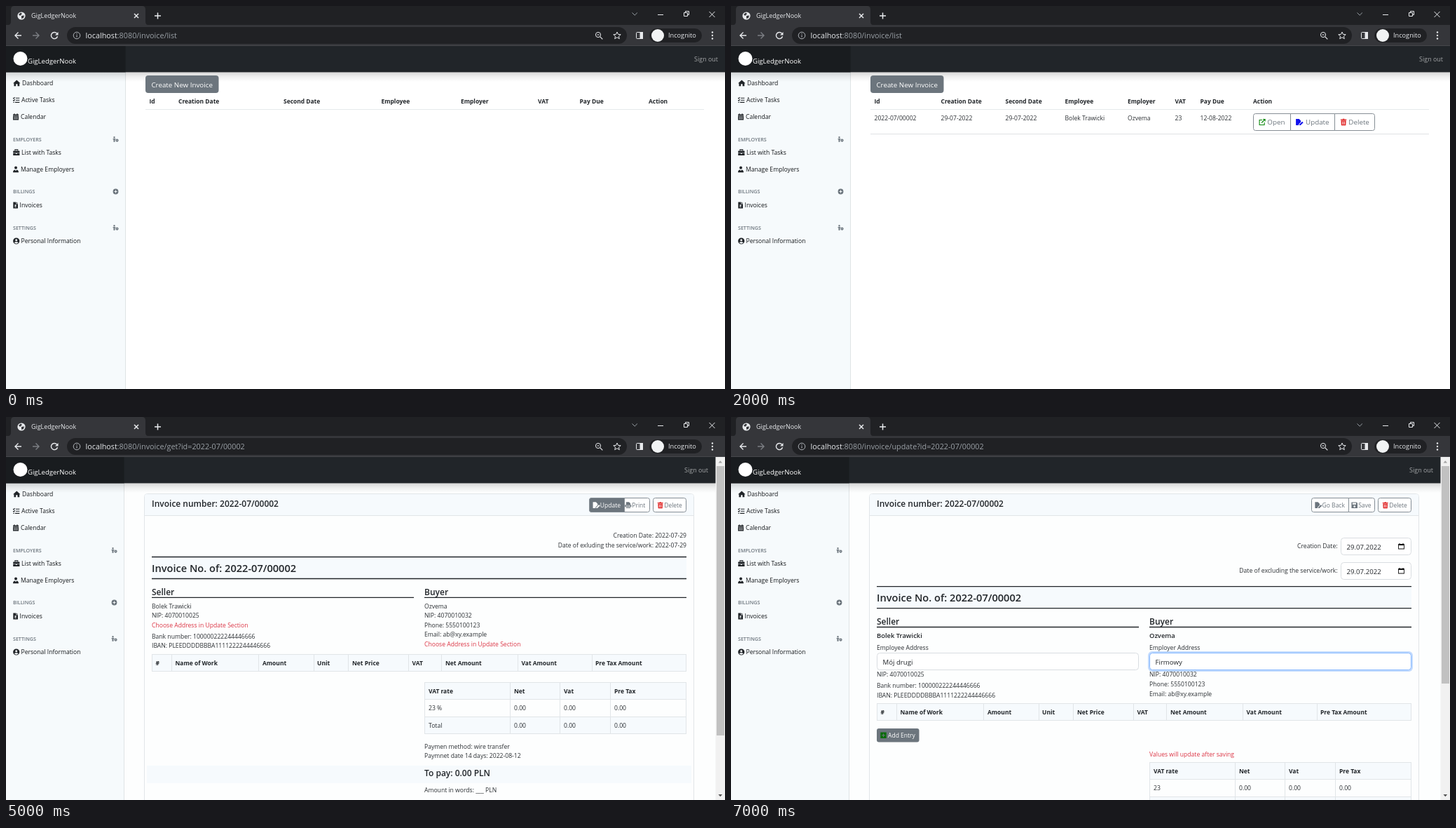
An HTML page that plays this animation: 1026 by 546 pixels, repeating every 8000 ms.

```html
<!DOCTYPE html>
<html lang="en">
<head>
<meta charset="utf-8">
<title>Invoices</title>
<style>
html, body { margin: 0; width: 100%; height: 100%; overflow: hidden; background: #fff; }
svg { display: block; width: 100%; height: 100%; }
text { font-family: "Open Sans", "Noto Sans", sans-serif; white-space: pre; }
</style>
</head>
<body>
<svg id="stage" viewBox="0 0 1026 546"></svg>
<script>
const INK = '#212529', GREY = '#6c757d', PALE = '#f6fafd', EDGE = '#e1e5e8', RED = '#dc3545', BODY = 8.6;
const BRAND = 'GigLedgerNook', SELLER = 'Bolek Trawicki', BUYER = 'Ozvema', NUMBER = '2022-07/00002';
const SECONDS = 8;

const text = (x, y, str, size = BODY, fill = '#2b2f33', weight = 400, anchor = 'start') =>
  `<text x="${x}" y="${y}" font-size="${size}" fill="${fill}" font-weight="${weight}" text-anchor="${anchor}">${str}</text>`;
const bold = (x, y, str) => text(x, y, str, 8.45, INK, 700);
const heading = (x, y, str, size = 12) => text(x, y, str, size, INK, 600);
const rect = (x, y, x2, y2, fill, r = 0, stroke = 'none') =>
  `<rect x="${x}" y="${y}" width="${x2 - x}" height="${y2 - y}" rx="${r}" fill="${fill}" stroke="${stroke}"/>`;
const circle = (x, y, r, fill, stroke = 'none') =>
  `<circle cx="${x}" cy="${y}" r="${r}" fill="${fill}" stroke="${stroke}"/>`;
const line = (d, color, width = 1) =>
  `<path d="${d}" fill="none" stroke="${color}" stroke-width="${width}"/>`;

// Icons are drawn around 0,0: [filled path, stroked path]
const ICONS = {
  home: ['M-5.2 .3L0-4.6 5.2 .3H3.9V4.2H1.2V1.2H-1.2V4.2H-3.9V.3Z', ''],
  tasks: ['', 'M-4.6-3l1 1 1.6-2M-4.6 .1l1 1 1.6-2M-4.3 3.4h1.3M-.8-2.8H4.6M-.8 .2H4.6M-1.8 3.4H4.6'],
  calendar: ['M-4-3.4h8v1.6h-8ZM-4-1.2h8v5.6h-8ZM-2.8 0v1h1.4v-1ZM-.7 0v1h1.4v-1ZM1.4 0v1h1.4v-1ZM-2.8 2v1h1.4v-1ZM-.7 2v1h1.4v-1ZM1.4 2v1h1.4v-1Z', 'M-2-4.8v2M2-4.8v2'],
  briefcase: ['M-4.6-2.6h9.2V.4h-9.2ZM-4.6 1H-1V2H1V1H4.6V4h-9.2Z', 'M-2-2.6v-1.5h4v1.5'],
  user: ['M-2-2.4a2 2.1 0 1 0 4 0a2 2.1 0 1 0-4 0M-4 4.3C-4 1.7-2.6 .6-1.4 .6L0 2 1.4 .6C2.6 .6 4 1.7 4 4.3Z', ''],
  invoice: ['M-3.3-4.5H.8V-1.8H3.4V4.5H-3.3ZM1.4-4.5L3.4-2.4H1.4ZM-1-.8V2.8H1V2H-.2V1.2H1V-.8Z', ''],
  profile: ['M-4.6 0a4.6 4.6 0 1 0 9.2 0a4.6 4.6 0 1 0-9.2 0M-1.5-1.2a1.5 1.5 0 1 1 3 0a1.5 1.5 0 1 1-3 0M-2.8 2.6C-2.2 .9 2.2 .9 2.8 2.6C1.4 4-1.4 4-2.8 2.6', ''],
  plus: ['M-3.9 0a3.9 3.9 0 1 0 7.8 0a3.9 3.9 0 1 0-7.8 0M-2-.5H-.5V-2H.5V-.5H2V.5H.5V2H-.5V.5H-2Z', ''],
  person: ['M-3.2-2.8a1.2 1.2 0 1 0 2.4 0a1.2 1.2 0 1 0-2.4 0M-.1 1.6a2.1 2.1 0 1 0 4.2 0a2.1 2.1 0 1 0-4.2 0M1.3 1.2h1.4v.9h-1.4ZM-3-1H-1V3.8H-3Z', 'M-4-.3H0'],
  open: ['', 'M0-3H-4V4H3V.5M1-4H4V-1M4-4L-1 1'],
  edit: ['M-5-4.6H-.5L2-2.1V0L-1 3V4.6H-5ZM0 3.2L4 -.8 5.6 .8 1.6 4.6H0Z', ''],
  trash: ['M-4.2-4H-1.5L-1-4.8H1L1.5-4H4.2V-2.8H-4.2ZM-3.6-2.2H3.6L3.2 4.7H-3.2ZM-2-1V3.4H-1.3V-1ZM-.4-1V3.4H.4V-1ZM1.3-1V3.4H2V-1Z', ''],
  print: ['M-3-4.6H1.4L3.4-2.6V-.8H-3ZM-4.8-.6H4.8V2.8H-4.8ZM-3.2 .6V1.8H-2V.6ZM-.8 .6V1.8H.4V.6ZM1.6 .6V1.8H3V.6Z', 'M-3 3.8H3.4'],
  save: ['M-4.5-4.5H3L4.5-3V4.5H-4.5ZM-3-3.4V-1H2.4V-3.4ZM-1.5 2a1.5 1.5 0 1 1 3 0a1.5 1.5 0 1 1-3 0', ''],
  add: ['M-4.2-4.2H4.2V4.2H-4.2ZM-2.4-.5H-.5V-2.4H.5V-.5H2.4V.5H.5V2.4H-.5V.5H-2.4Z', ''],
  date: ['M-4.4-3.6H4.4V4H-4.4ZM-3.5-1.4V3.1H3.5V-1.4Z', 'M-2.5-4.6v1.5M2.5-4.6v1.5']
};
const icon = (name, x, y, color = INK, scale = 1) => {
  const [solid, stroke] = ICONS[name];
  return `<g transform="translate(${x} ${y}) scale(${scale})"><path d="${solid}" fill="${color}" fill-rule="evenodd"/>${line(stroke, color, 1.1)}</g>`;
};

const browser = () => {
  const w = '#e8eaed';
  return rect(0, 0, 1026, 28, '#202124') + rect(0, 27, 1026, 57, '#35363a') +
    line('M0 56.5H1026', '#47484c') +
    `<path d="M3 27Q7 27 7 22V5Q7 0 12 0H194Q199 0 199 5V22Q199 27 203 27Z" fill="#35363a"/>` +
    circle(22, 14, 5.6, w) + `<path d="M18 12L21 9.5 23 11 20 14ZM22 14L26 13.5 25 17 22 18Z" fill="#35363a"/>` +
    text(36, 17, BRAND, 8.9, w) +
    line('M183 11l6 6m0-6l-6 6M212 14h9m-4.5-4.5v9', w, 1.5) +
    line('M893.5 9.5l3.7 3.7 3.7-3.7', '#9aa0a6') +
    line('M930 12.5h8M967.5 9.5h5v5h-5ZM969.5 9.5v-2h5v5h-2M1003.5 8l8 8m0-8l-8 8', w) +
    line('M22 42H13m4.5-4.5L13 42l4.5 4.5', w, 1.4) +
    line('M38 42H47m-4.5-4.5L47 42l-4.5 4.5', '#7c7f84', 1.4) +
    line('M72.5 39A4.6 4.6 0 1 0 73.5 43.2', w, 1.4) + `<path d="M74.5 37v4.5h-4.5Z" fill="${w}"/>` +
    rect(87, 30, 886, 54, '#202124', 12) +
    circle(101, 42, 4.8, 'none', '#b0b4b9') + line('M101 41.5v3M101 39v1.2', '#b0b4b9', 1.1) +
    circle(845, 41, 3.6, 'none', w) + line('M843.5 41h3M847.8 43.8l3.5 3.5', w, 1.2) +
    line('M872 37l1.5 3.4 3.7.3-2.8 2.4.9 3.6-3.3-2-3.3 2 .9-3.6-2.8-2.4 3.7-.3Z', w) +
    rect(899.5, 37.5, 908.5, 46.5, 'none', 1, w) + rect(904.5, 37, 909, 47, w) +
    rect(918, 32, 993, 52, '#202124', 10) + circle(930, 42, 9, '#f1f3f4') +
    text(945, 45.3, 'Incognito', 9.2, w) +
    [37.5, 42, 46.5].map(y => circle(1008, y, 1.2, w)).join('');
};

const MENU = [
  ['home', 15.3, 23, 110, 'Dashboard'], ['tasks', 14.7, 22, 134, 'Active Tasks'], ['calendar', 14, 21, 158, 'Calendar'],
  ['briefcase', 14.8, 22, 209, 'List with Tasks'], ['user', 14, 21, 233, 'Manage Employers'],
  ['invoice', 13.6, 19.5, 284, 'Invoices'], ['profile', 14.7, 21.5, 335, 'Personal Information']
];
const SECTIONS = [['EMPLOYERS', 190, 'person'], ['BILLINGS', 264.5, 'plus'], ['SETTINGS', 316, 'person']];

const scrollbar = end => rect(1012.5, 57, 1026, 546, '#f1f1f1') + rect(1014, 70, 1025, end, '#c1c1c1') +
  `<path d="M1016.5 65.5l2.8-3.2 2.8 3.2Z" fill="#a3a3a3"/><path d="M1016.5 538l2.8 3.2 2.8-3.2Z" fill="#505050"/>`;

// Address, header and sidebar; a scrollbar narrows the page.
const page = (path, scrollEnd) => {
  const side = scrollEnd ? 168.5 : 170.5, right = scrollEnd ? 1002 : 1016;
  return `<text x="113.5" y="45.8" font-size="10.8" fill="#9aa0a6"><tspan fill="#e8eaed">localhost</tspan>:8080/invoice/${path}</text>` +
    rect(0, 57, 1026, 546, scrollEnd ? '#fdfefe' : '#fff') +
    rect(0, 94, side, 546, '#f6fafc') + line(`M${side} 94V546`, '#dfe3e5') +
    rect(0, 94, 1026, 108, 'url(#shade)') +
    rect(0, 57, 1026, 94.4, INK) + rect(0, 57, side, 94.4, '#191c1f') +
    circle(20.5, 75, 10, '#fff') + text(31, 82, BRAND, 9.55, '#fff') +
    text(right, 79.2, 'Sign out', 8.95, '#a2a4a6', 400, 'end') +
    MENU.map(([name, ix, x, y, label]) => icon(name, ix, y) + text(x, y + 3.2, label, 8.6, '#15181b')).join('') +
    SECTIONS.map(([label, y, name]) => text(10, y + 2.6, label, 7.1, GREY, 600) + icon(name, side - 14, y, GREY)).join('') +
    (scrollEnd ? scrollbar(scrollEnd) : '');
};

const field = (x, y, x2, value, focus) =>
  (focus ? rect(x - 2.5, y - 2.5, x2 + 2.5, y + 26.5, '#c2dbfe', 6) : '') +
  rect(x, y, x2, y + 24, '#fff', 4, focus ? '#86b7fe' : '#d9dde1') +
  text(x + 8, y + 16.2, value, 9.65, INK);
const dateField = (x, y, x2) => field(x, y, x2, '29.07.2022') + icon('date', x2 - 14, y + 12, '#111');

// A button segment, rounded only on the sides named in ends
const segment = (x, y, x2, y2, ends, fill = '#fff') => {
  const l = ends.includes('l') ? 3 : 0, r = ends.includes('r') ? 3 : 0;
  return `<path d="M${x + l} ${y}H${x2 - r}q${r} 0 ${r} ${r}V${y2 - r}q0 ${r} ${-r} ${r}H${x + l}q${-l} 0 ${-l} ${-l}V${y + l}q0 ${-l} ${l} ${-l}Z" fill="${fill}" stroke="#868e95"/>`;
};
const rowButton = (x, x2, ends, name, color, label, tx, active) =>
  segment(x, 153.5, x2, 177.5, ends, active ? GREY : '#fff') + icon(name, x + 12.6, 165.5, color) +
  text(tx, 169, label, 9.8, active ? '#fff' : GREY);
const cardButton = (x, x2, ends, name, color, label, tx, active) =>
  segment(x, 115.5, x2, 135.5, ends, active ? GREY : '#fff') + icon(name, tx - 5.5, 125.7, color, .95) +
  text(tx, 129, label, 8.5, active ? '#fff' : GREY);

const COLUMNS = ['Id', 'Creation Date', 'Second Date', 'Employee', 'Employer', 'VAT', 'Pay Due', 'Action'];
const listPage = xs => page('list') + rect(199, 99, 303.5, 124, GREY, 4) +
  text(251.2, 115.5, 'Create New Invoice', 9.8, '#fff', 400, 'middle') +
  xs.map((x, i) => bold(x, 138.5, COLUMNS[i])).join('') + line('M199 147.5H996', '#e6e9eb');
const openButton = active => rowButton(745.5, 798.5, 'l', 'open', '#0a870a', 'Open', 765.3, active);

const emptyList = () => listPage([204.5, 246, 396, 535.5, 649, 759, 818.5, 917]);
const filledList = () => {
  const xs = [204.5, 299.5, 391.5, 476.5, 566, 633.5, 669.5, 745];
  const row = [NUMBER, '29-07-2022', '29-07-2022', SELLER, BUYER, '23', '12-08-2022'];
  return listPage(xs) + row.map((value, i) => text(xs[i], 163.3, value)).join('') +
    line('M199 182.5H996', '#dfe2e5') + openButton(false) +
    rowButton(798.5, 861.5, '', 'edit', '#1010ee', 'Update', 820, false) +
    rowButton(861.5, 918.5, 'r', 'trash', '#e02020', 'Delete', 881.3, false);
};

const createPage = () => page('create') + heading(199, 119.5, 'Invoice:', 19) +
  text(199, 139, 'Invoice Creation Date:', 8.5) + dateField(199.5, 142.5, 994.5) +
  text(199, 177, 'Employee:', 8.5) + field(199.5, 180.5, 994.5, SELLER) +
  text(199, 214.5, 'Employer:', 8.5) + field(199.5, 218.5, 994.5, BUYER, true) +
  rect(199, 248, 995, 272.2, '#0d6efd', 4) + rect(199, 272.2, 995, 296.5, GREY, 4) +
  text(597, 264, 'Create', 9.7, '#fff', 400, 'middle') + text(597, 288.5, 'Cancel', 9.7, '#fff', 400, 'middle');

const card = () => rect(197.5, 109.5, 981.5, 560, '#fdfefe', 4, EDGE) + rect(198, 110, 981, 140.5, PALE, 3) +
  line('M198 140.5H981', EDGE) + heading(208, 128, 'Invoice number: ' + NUMBER) +
  cardButton(923.5, 970.5, 'lr', 'trash', '#e02020', 'Delete', 939.2);
const titles = y => rect(208, y, 971, y + 31, PALE) + line(`M208 ${y}H971M208 ${y + 31}H971`, INK, 1.3) +
  heading(208, y + 21.6, 'Invoice No. of: ' + NUMBER, 14.6) +
  heading(208, y + 54.2, 'Seller') + heading(597, y + 54.2, 'Buyer') +
  line(`M208 ${y + 57.8}H582M597 ${y + 57.8}H971`, INK, 1.3);
const lines = (x, rows) => rows.map(([y, str, color]) => text(x, y, str, BODY, color)).join('');

const dividers = (xs, y, height) => line(xs.map(x => `M${x} ${y}v${height}`).join(''), EDGE);
const workTable = y => rect(208.5, y, 970.5, y + 24, PALE, 0, EDGE) +
  dividers([236.5, 360.5, 439.5, 488.5, 574.5, 621.5, 730.5, 836.5], y, 24) +
  [[213.5, '#'], [241.5, 'Name of Work'], [366, 'Amount'], [444, 'Unit'], [494, 'Net Price'], [579.5, 'VAT'],
    [627, 'Net Amount'], [735.5, 'Vat Amount'], [841, 'Pre Tax Amount']].map(([x, s]) => bold(x, y + 15.5, s)).join('');
const totals = (y, labels) => {
  const xs = [603, 725, 796, 868], rowTop = i => y + Math.round(i * 24.4);
  return ['VAT rate', ...labels].map((label, i) => {
    const cells = i ? [label, '0.00', '0.00', '0.00'] : [label, 'Net', 'Vat', 'Pre Tax'];
    return rect(597.5, rowTop(i), 970.5, rowTop(i + 1), i === 1 ? '#fdfefe' : PALE, 0, EDGE) +
      cells.map((s, c) => (i ? text : bold)(xs[c], rowTop(i) + 15.7, s)).join('');
  }).join('') + dividers([719.5, 790.5, 862.5], y, rowTop(labels.length + 1) - y);
};

const NIP = 'NIP: 4070010025', BUYER_NIP = 'NIP: 4070010032', PHONE = 'Phone: 5550100123', EMAIL = 'Email: ab@xy.example';
const BANK = 'Bank number: 100000222244446666', IBAN = 'IBAN: PLEEDDDDBBBA1111222244446666';
const CHOOSE = 'Choose Address in Update Section';

const updateButton = active => cardButton(832.5, 882.5, 'l', 'edit', active ? '#fff' : GREY, 'Update', 847.8, active);
const invoicePage = () => page('get?id=' + NUMBER, 454) + card() +
  updateButton(false) + cardButton(882.5, 918.5, 'r', 'print', GREY, 'Print', 893.3) +
  text(971, 172.2, 'Creation Date: 2022-07-29', BODY, undefined, 400, 'end') +
  text(971, 185.6, 'Date of exluding the service/work: 2022-07-29', BODY, undefined, 400, 'end') +
  titles(199.5) +
  lines(208, [[273, SELLER], [286.4, NIP], [299.8, CHOOSE, RED], [315.8, BANK], [329.2, IBAN]]) +
  lines(597, [[273, BUYER], [286.4, BUYER_NIP], [299.8, PHONE], [313.4, EMAIL], [327, CHOOSE, RED]]) +
  workTable(338.5) + totals(378.5, ['23 %', 'Total']) +
  lines(597, [[472.5, 'Paymen method: wire transfer'], [486, 'Paymnet date 14 days: 2022-08-12'], [535.2, 'Amount in words: ___ PLN']]) +
  rect(201, 497, 978, 522, PALE) + heading(597, 512.3, 'To pay: 0.00 PLN');

const updatePage = () => page('update?id=' + NUMBER, 380) + card() +
  cardButton(828.5, 881.5, 'l', 'edit', GREY, 'Go Back', 843.6) + cardButton(881.5, 918.5, 'r', 'save', GREY, 'Save', 895.2) +
  text(865.5, 187, 'Creation Date:', BODY, undefined, 400, 'end') + dateField(870.5, 172.5, 970.5) +
  text(865.5, 221.5, 'Date of excluding the service/work:', BODY, undefined, 400, 'end') + dateField(870.5, 207.5, 970.5) +
  titles(241.7) + text(208, 315.2, SELLER, 9.4, INK, 600) + text(597, 315.2, BUYER, 9.4, INK, 600) +
  lines(208, [[332.4, 'Employee Address'], [370.3, NIP], [386.4, BANK], [399.8, IBAN]]) +
  lines(597, [[332.4, 'Employer Address'], [370.3, BUYER_NIP], [383.8, PHONE], [397.5, EMAIL], [483.7, 'Values will update after saving', RED]]) +
  field(208.5, 336.5, 581.5, 'Mój drugi') + field(597.5, 336.5, 970.5, 'Firmowy', true) +
  workTable(408.5) + rect(208, 444, 268.5, 463.5, GREY, 3) + icon('add', 217.5, 453.8, '#0b6b0b') +
  text(224, 457.2, 'Add Entry', 8.55, '#fff') + totals(492.5, ['23', 'Total']);

// [from second, to second, drawing]
const SCENES = [
  [0, 1, emptyList()],
  [1, 2, createPage()],
  [2, 4, filledList()],
  [3, 4, openButton(true)],
  [4, 6, invoicePage()],
  [5, 6, updateButton(true)],
  [6, 8, updatePage()]
];

const stage = document.getElementById('stage');
stage.innerHTML = `<defs><linearGradient id="shade" x2="0" y2="1"><stop stop-opacity=".16"/>
  <stop offset=".5" stop-opacity=".06"/><stop offset="1" stop-opacity="0"/></linearGradient></defs>` + browser() +
  SCENES.map(([, , drawing]) => `<g class="scene" opacity="0">${drawing}</g>`).join('');

stage.querySelectorAll('.scene').forEach((scene, i) => {
  const [from, to] = SCENES[i], last = to < SECONDS ? 0 : 1;
  const steps = [[0, from ? 0 : 1], [from / SECONDS, 1], [to / SECONDS, last], [1, last]];
  const animation = scene.animate(
    steps.map(([offset, opacity]) => ({ offset, opacity, easing: 'step-end' })),
    { duration: SECONDS * 1000, iterations: Infinity });
  animation.startTime = 0;
});
</script>
</body>
</html>
```
